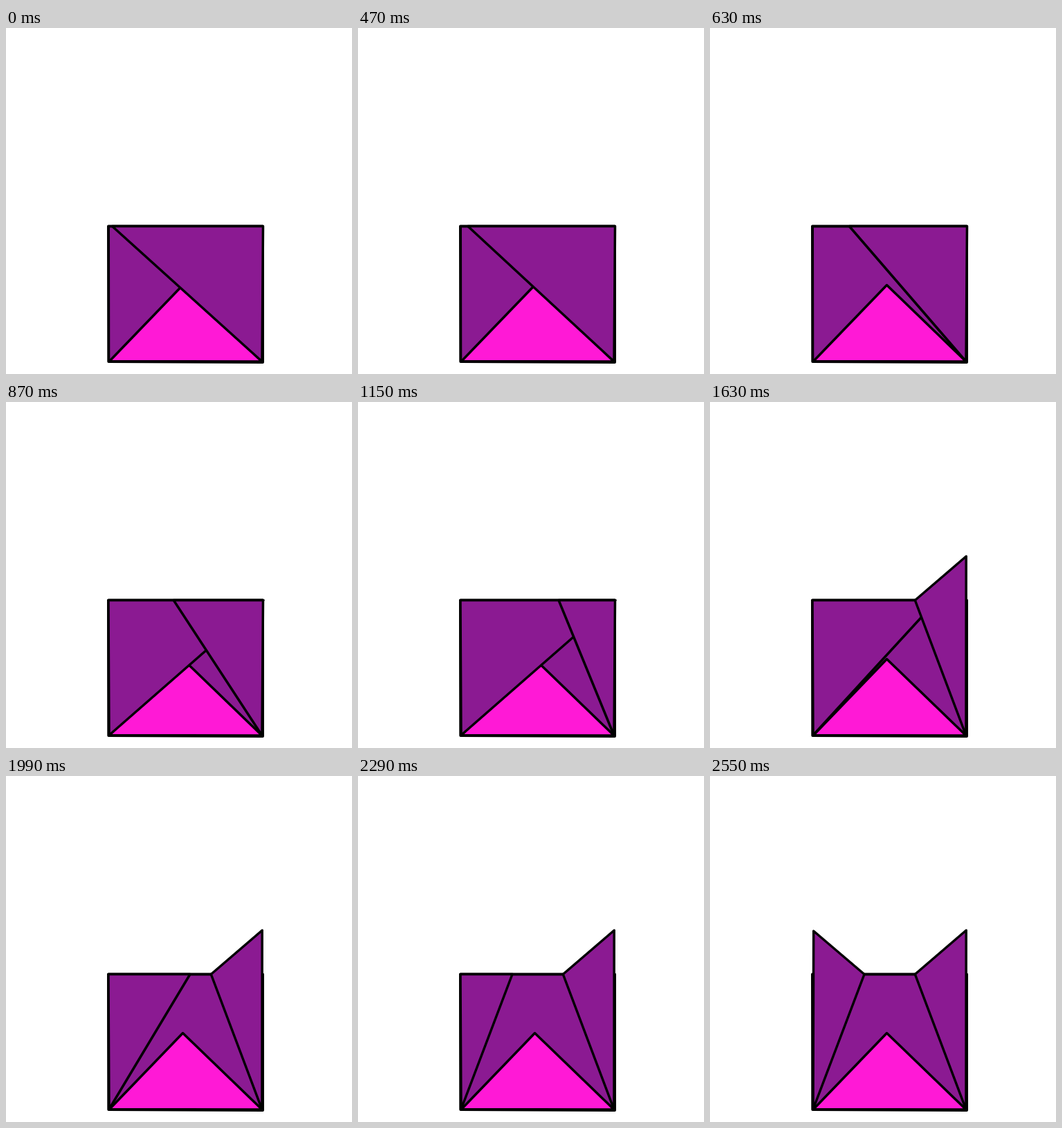
These frames come from a looping animation (500x500 px, 2970 ms). An HTML page with a canvas:

```html
<!DOCTYPE html>
<html lang="en">
<head>
<meta charset="utf-8">
<title>Folding paper cat</title>
<style>
  html, body { margin: 0; width: 100%; height: 100%; overflow: hidden; background: #fff; }
  canvas { display: block; width: 100vmin; height: 100vmin; }
</style>
</head>
<body>
<canvas width="500" height="500"></canvas>
<script>
const ctx = document.querySelector('canvas').getContext('2d');
const LOOP = 2970, START = 470, STEP = 20;
const PURPLE = '#8b1a92', PINK = '#ff19d6';
const TOP = 286.5;

// edge: [time, x] keys of the upper end of the sliding edge
const right = {
  foot: [370, 482], corner: [371.5, TOP], tip: [370.2, 223],
  edge: [[450, 153.5], [630, 201.3], [1150, 290], [1210, 296.3]], earEnd: 1470
};
const left = {
  foot: [149, 481.5], corner: [148, TOP], tip: [149.7, 224],
  edge: [[1530, 372], [1630, 328], [1990, 266], [2290, 223]], earEnd: 2550,
  appears: 810
};

const mix = (a, b, p) => a + (b - a) * p;
const progress = (t, from, to) => Math.min(1, Math.max(0, (t - from) / (to - from)));

function keyed(keys, t) {
  let x = keys[0][1];
  for (let i = 1; i < keys.length; i++) {
    x = mix(x, keys[i][1], progress(t, keys[i - 1][0], keys[i][0]));
  }
  return x;
}

function polygon(points, fill, width) {
  ctx.beginPath();
  points.forEach(([x, y]) => ctx.lineTo(x, y));
  ctx.closePath();
  ctx.fillStyle = fill;
  ctx.fill();
  ctx.lineWidth = width;
  ctx.stroke();
}

function drawFlap({ foot, corner, tip, edge, earEnd }, t) {
  const x = keyed(edge, t);
  const p = progress(t, edge[edge.length - 1][0], earEnd);
  const outer = p > 0 ? [mix(x, tip[0], p), mix(TOP, tip[1], p)] : corner;
  polygon([foot, [x, TOP], outer], PURPLE, 3.5);
}

function draw(time) {
  const t = START + Math.floor((time % LOOP - START) / STEP) * STEP;
  ctx.fillStyle = '#fff';
  ctx.fillRect(0, 0, 500, 500);
  ctx.strokeStyle = '#000';
  ctx.lineJoin = 'round';
  polygon([[148, 286.5], [371, 286.5], [371, 483], [148.3, 482]], PURPLE, 4);
  polygon([[149.5, 481.5], [255.5, 371.5], [370, 482]], PINK, 3.5);
  if (t >= left.appears) drawFlap(left, t);
  drawFlap(right, t);
}

function tick() {
  draw(performance.now());
  requestAnimationFrame(tick);
}
tick();
</script>
</body>
</html>
```
